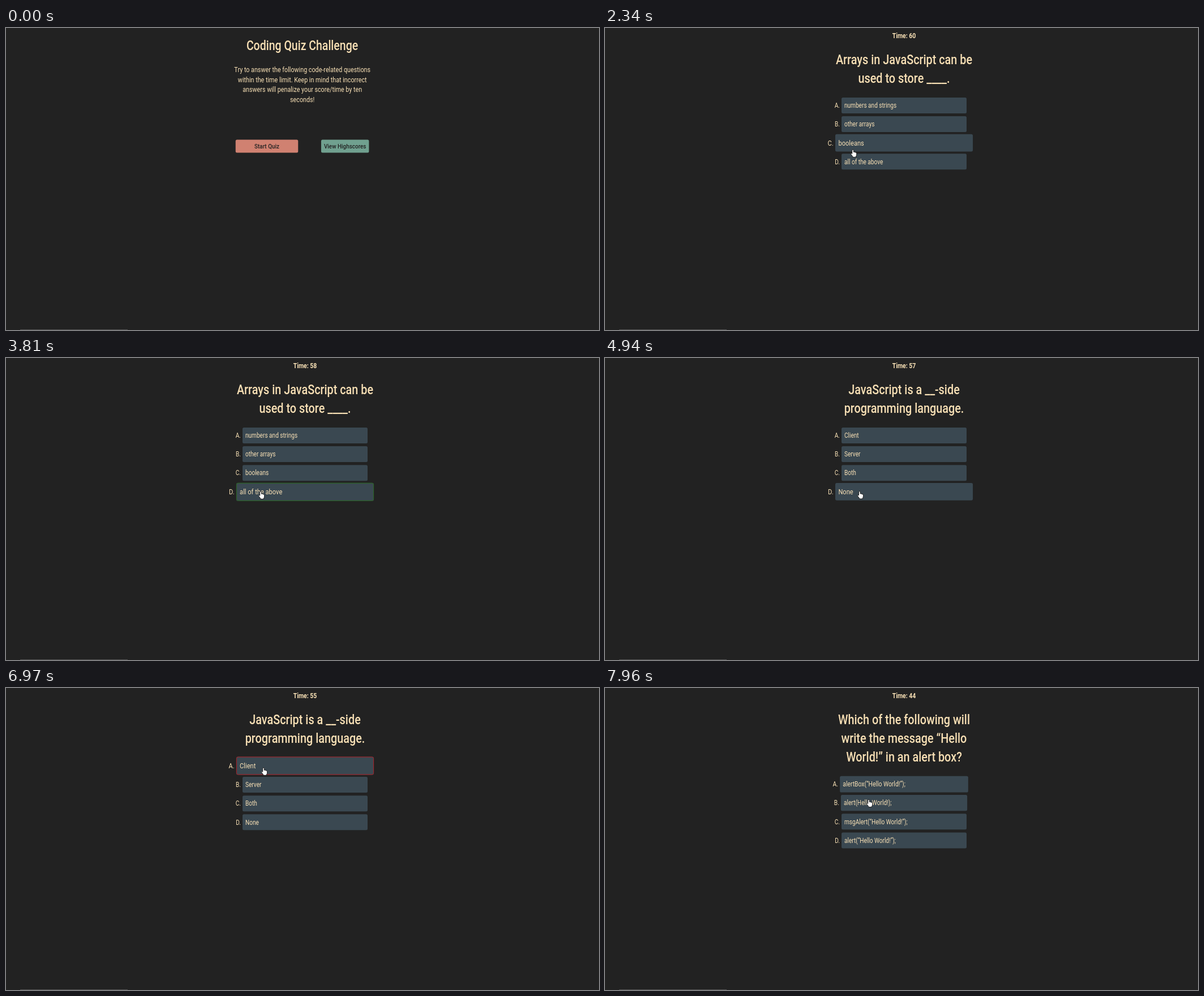
An HTML page with a canvas for the animation above (7.99 s loop, 1048 px wide and 534 px high).

```html
<!DOCTYPE html>
<html lang="en">
<head>
<meta charset="utf-8">
<title>Coding Quiz Challenge</title>
<style>
  html, body { margin: 0; width: 100%; height: 100%; overflow: hidden; background: #222; }
  canvas { display: block; width: 1048px; height: 534px; }
</style>
</head>
<body>
<canvas id="stage" width="1048" height="534"></canvas>
<script>
const ctx = document.getElementById('stage').getContext('2d');
const LOOP = 7990, FADE = 250;
const CREAM = '#f8e0b5', PANEL = '#3a4851', DARK = '#222222';
const NARROW = 0.84; // one condensed face for all text
const MID = 528.5;

const QUESTIONS = [
  { at: 1590, title: ['Arrays in JavaScript can be', 'used to store ____.'],
    options: ['numbers and strings', 'other arrays', 'booleans', 'all of the above'] },
  { at: 4550, title: ['JavaScript is a __-side', 'programming language.'],
    options: ['Client', 'Server', 'Both', 'None'] },
  { at: 7710, title: ['Which of the following will', 'write the message “Hello', 'World!” in an alert box?'],
    options: ['alertBox(“Hello World!”);', 'alert(Hello World!);', 'msgAlert(“Hello World!”);', 'alert(“Hello World!”);'] }
];

// row, pointer enters, pointer leaves
const HOVERS = [
  [2, 1685, 2470], [3, 2500, 5030], [2, 5060, 6310],
  [1, 6340, 6500], [0, 6520, 7850], [1, 7935, 9000]
];

// row, click, cleared, colour
const MARKS = [
  [3, 3560, 4550, '#2a6a20'],
  [0, 6720, 7710, '#b01f25']
];

const TICKS = [[2550, 59], [3550, 58], [4550, 57], [5510, 56], [6530, 55], [7530, 44]];

// time, x, y of the pointer tip
const PATH = [
  [220, 1003, 533], [400, 880, 470], [600, 650, 350], [800, 490, 262], [930, 437, 220],
  [1010, 434, 217], [2210, 434, 217], [2340, 438, 215], [2480, 441, 220], [2700, 444, 229],
  [3000, 446, 234], [3030, 446, 234], [3300, 455, 238], [3500, 450, 236], [4550, 450, 236],
  [4670, 450, 241], [4880, 450, 241], [5040, 449, 221], [5250, 447, 210], [5510, 445, 200],
  [5670, 445, 200], [5740, 445, 201], [6090, 445, 201], [6310, 447, 188], [6520, 451, 152],
  [6750, 455, 141], [7310, 455, 141], [7600, 460, 149], [7740, 463, 164], [7850, 465, 184],
  [7920, 466, 190], [7960, 466, 197], [7990, 467, 202]
];

const clamp = v => Math.max(0, Math.min(1, v));

// cubic-bezier(.25, .1, .25, 1)
function ease(p) {
  p = clamp(p);
  let lo = 0, hi = 1, u = p;
  for (let i = 0; i < 18; i++) {
    u = (lo + hi) / 2;
    const x = 0.75 * u * (1 - u) ** 2 + 0.75 * u * u * (1 - u) + u ** 3;
    if (x < p) lo = u; else hi = u;
  }
  return 0.3 * u * (1 - u) ** 2 + 3 * u * u * (1 - u) + u ** 3;
}

const pulse = (t, on, off, out = FADE) =>
  ease((t - on) / FADE) * (1 - ease((t - off) / out));

function slope(i, axis) {
  const a = PATH[i - 1], b = PATH[i], c = PATH[i + 1];
  if (!a || !c) return 0;
  const still = (p, q) => p[1] === q[1] && p[2] === q[2];
  if (still(a, b) || still(b, c)) return 0;
  return (c[axis] - a[axis]) / (c[0] - a[0]);
}

function pointerAt(t) {
  let i = 0;
  while (i < PATH.length - 2 && PATH[i + 1][0] <= t) i++;
  const a = PATH[i], b = PATH[i + 1], d = b[0] - a[0];
  const p = clamp((t - a[0]) / d), q = 1 - p;
  return [1, 2].map(k =>
    a[k] * q * q * (1 + 2 * p) + b[k] * p * p * (1 + 2 * q) +
    d * p * q * (slope(i, k) * q - slope(i + 1, k) * p));
}

function text(str, x, y, size, { align = 'center', weight = 400, color = CREAM } = {}) {
  ctx.save();
  ctx.translate(x, y + size * 0.35);
  ctx.scale(NARROW, 1);
  ctx.font = `${weight} ${size}px Roboto, "Liberation Sans", sans-serif`;
  ctx.textAlign = align;
  ctx.fillStyle = color;
  ctx.fillText(str, 0, 0);
  ctx.restore();
}

function box(x, y, w, h, color) {
  ctx.beginPath();
  ctx.roundRect(x, y, w, h, 2.5);
  ctx.fillStyle = color;
  ctx.fill();
}

function scaled(x, y, k, draw) {
  ctx.save();
  ctx.translate(x, y);
  ctx.scale(k, k);
  draw();
  ctx.restore();
}

function button(label, x, w, color, grow) {
  scaled(x, 209, 1 + 0.1 * grow, () => {
    box(-w / 2, -11.5, w, 23, color);
    text(label, 0, 0, 11.8, { color: DARK, weight: 500 });
  });
}

function home(t) {
  text('Coding Quiz Challenge', 523.5, 31, 23.2, { weight: 500 });
  ['Try to answer the following code-related questions',
   'within the time limit. Keep in mind that incorrect',
   'answers will penalize your score/time by ten',
   'seconds!'].forEach((line, i) => text(line, 523.7, 73.5 + i * 17.7, 12.8));
  button('Start Quiz', 461, 110.5, '#d08171', ease((t - 925) / FADE));
  button('View Highscores', 599.2, 84.5, '#70a08f', 0);
}

function option(row, label, y, grow, mark, color) {
  const h = 28 + mark;
  scaled(MID, y + h / 2, 1 + 0.1 * grow, () => {
    box(-110.5, -h / 2, 221, h, PANEL);
    if (mark > 0) {
      ctx.globalAlpha = mark;
      ctx.strokeStyle = color;
      ctx.lineWidth = 0.9;
      ctx.beginPath();
      ctx.roundRect(-110.1, -h / 2 + 0.4, 220.2, h - 0.8, 2.5);
      ctx.stroke();
      ctx.globalAlpha = 1;
    }
    text('ABCD'[row] + '.', -113.5, 0, 12, { align: 'right' });
    text(label, -105.5 + mark * 0.6, 0, 12, { align: 'left' });
  });
}

function quiz(t) {
  const q = QUESTIONS.filter(item => t >= item.at).pop();
  const left = TICKS.reduce((v, [at, n]) => t >= at ? n : v, 60);
  text('Time: ' + left, MID, 14, 12.5, { weight: 700 });
  q.title.forEach((line, i) => text(line, MID, 56 + i * 33.1, 23.6, { weight: 500 }));

  let y = 123 + (q.title.length - 2) * 33.1;
  q.options.forEach((label, row) => {
    const grow = HOVERS.filter(h => h[0] === row)
      .reduce((v, [, on, off]) => Math.max(v, pulse(t, on, off)), 0);
    const hit = MARKS.find(m => m[0] === row);
    const mark = hit ? pulse(t, hit[1], hit[2], 120) : 0;
    option(row, label, y, grow, mark, hit && hit[3]);
    y += 33.1 + mark;
  });
}

const HAND = new Path2D(
  'M-1.3 1 Q-1.2 0 0 0 Q1.2 0 1.3 1 V4.3 Q2.6 3.7 3.3 4.7 Q4.5 4.2 5 5.2 ' +
  'Q6.6 5 6.6 6.5 V9.2 Q6.5 10.8 5.4 12 V13.3 H-.3 V12.2 L-3.3 8.2 ' +
  'Q-3.9 6.9 -2.7 6.6 Q-2 6.5 -1.3 7.3 Z');
const ARROW = new Path2D('M0 0 V12 L2.8 9.5 L4.6 13.4 L6.4 12.6 L4.7 8.8 H8.4 Z');

function pointer(t) {
  if (t < 220) return;
  const [x, y] = pointerAt(t);
  const shape = t < 925 ? ARROW : HAND;
  ctx.save();
  ctx.translate(x, y);
  ctx.lineWidth = 0.9;
  ctx.strokeStyle = '#111';
  ctx.fillStyle = '#fff';
  ctx.fill(shape);
  ctx.stroke(shape);
  ctx.restore();
}

function frame(now) {
  const t = now % LOOP;
  ctx.fillStyle = DARK;
  ctx.fillRect(0, 0, 1048, 534);
  ctx.fillStyle = '#555';
  ctx.fillRect(25, 533, 190, 1);
  if (t < QUESTIONS[0].at) home(t); else quiz(t);
  pointer(t);
}

const start = performance.now();
function loop() {
  frame(performance.now() - start);
  requestAnimationFrame(loop);
}
loop();
</script>
</body>
</html>
```
